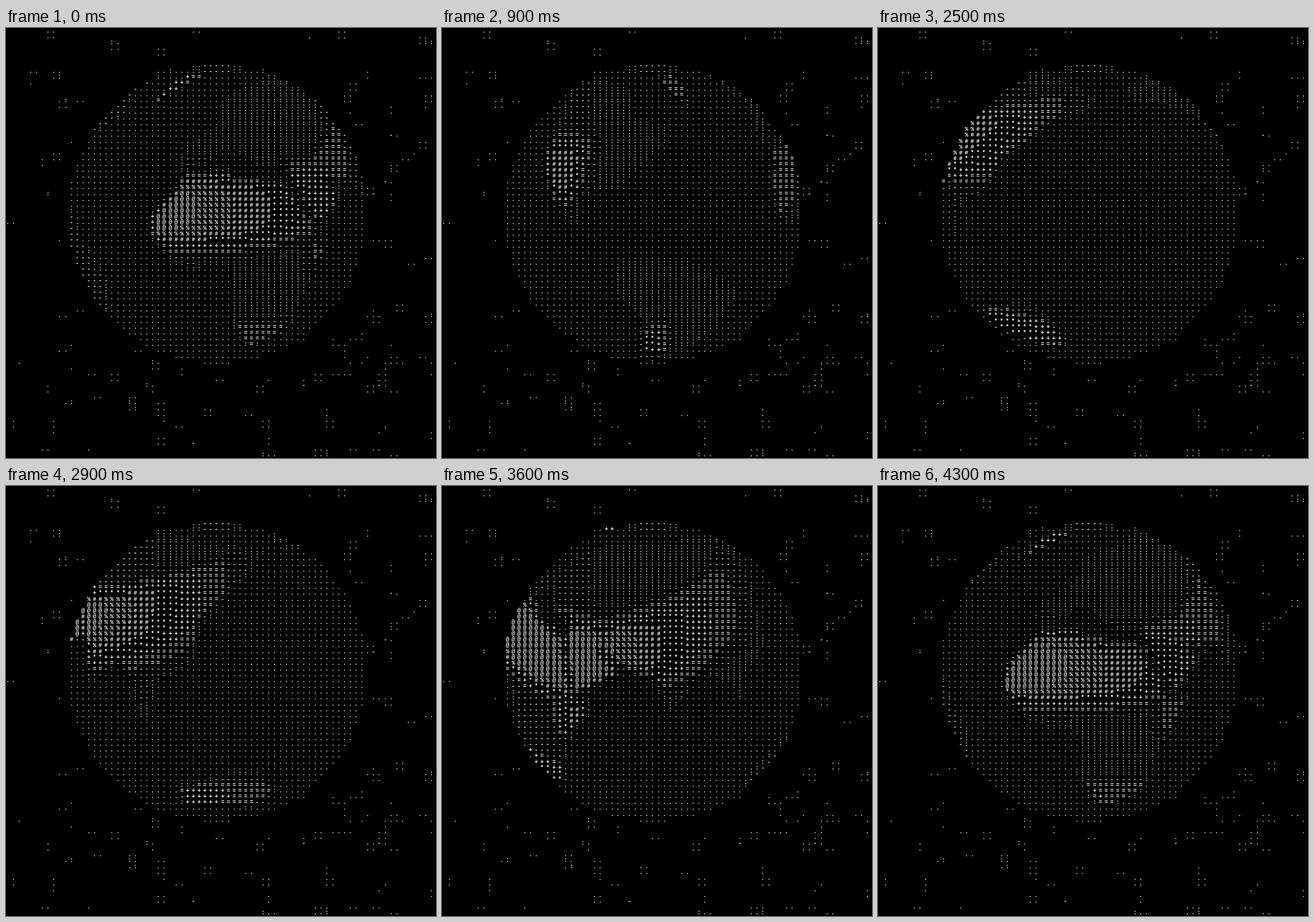
Write an HTML page with a canvas that moves like this. It is 748 px wide and 748 px high and loops after 4.4 s.

```html
<!DOCTYPE html>
<html lang="en">
<head>
<meta charset="utf-8">
<title>Text globe</title>
<style>
html, body { margin: 0; width: 100%; height: 100%; overflow: hidden; background: #000; }
canvas { display: block; width: 748px; height: 748px; }
</style>
</head>
<body>
<canvas id="stage" width="748" height="748"></canvas>
<script>
const ctx = document.getElementById('stage').getContext('2d');
const SIZE = 748, GRID = 74, CELL = SIZE / GRID;
const LOOP = 4400, STEP = 100;
const RAMP = ' .:-=+*#%@';
const RAD = Math.PI / 180;

// Globe placement, in cells; the camera sits DIST radii away, looking from TILT north.
const CX = 36.1, CY = 31.4, R = 25.75, DIST = 6, TILT = 23 * RAD, LON0 = 6;

// Rough coastlines: longitude, latitude.
const africa = [[-17, 15], [-16, 23], [-6, 35], [10, 37], [12, 33], [32, 31], [43, 12],
  [51, 11], [40, -5], [34, -27], [19, -35], [11, -16], [9, 4], [-8, 5]];
const eurasia = [[-9, 37], [-9, 44], [8, 56], [6, 62], [25, 71], [110, 75], [178, 67],
  [140, 54], [121, 38], [120, 26], [107, 18], [104, 2], [97, 17], [89, 22], [77, 8],
  [71, 21], [57, 26], [49, 30], [59, 22], [44, 13], [36, 29], [36, 36], [22, 38],
  [12, 45], [0, 39]];
const northAmerica = [[-165, 62], [-155, 71], [-85, 69], [-80, 57], [-56, 52], [-81, 31],
  [-97, 27], [-95, 17], [-82, 8], [-106, 22], [-123, 38], [-128, 52]];
const southAmerica = [[-78, 8], [-60, 9], [-35, -7], [-41, -22], [-68, -54], [-75, -42],
  [-70, -18], [-81, -5]];
const australia = [[114, -23], [136, -12], [143, -12], [153, -28], [146, -38], [131, -32],
  [115, -34]];
const greenland = [[-58, 80], [-22, 81], [-43, 60]];
const lands = [africa, eurasia, northAmerica, southAmerica, australia];

const clamp = (v, lo, hi) => Math.min(hi, Math.max(lo, v));
const bell = (v, mid, width) => Math.exp(-(((v - mid) / width) ** 4));

function inside(shape, lon, lat) {
  let hit = false;
  shape.forEach(([x1, y1], i) => {
    const [x2, y2] = shape[(i + 1) % shape.length];
    if ((y1 > lat) !== (y2 > lat) && lon < x1 + (lat - y1) / (y2 - y1) * (x2 - x1)) hit = !hit;
  });
  return hit;
}

// Dry belts near the tropics; the northern one drifts poleward across Asia.
function dryness(lon, lat) {
  const north = lat > 0;
  if (lon < -30) {
    return 4.3 * bell(lon, north ? -109 : -69, north ? 12 : 7) * bell(lat, north ? 34 : -29, 11);
  }
  const horn = 3.8 * bell(lon, 45, 9) * bell(lat, 5, 8);
  if (!north) return Math.max(horn, 3 * bell(lat, -26, 9));
  const east = Math.max(0, lon - 50), mid = 24 + 0.4 * east;
  const width = lat < mid ? 13 + 0.15 * east : 13 - 0.04 * east;
  return Math.max(horn, (6.8 - 0.06 * east) * bell(lat, mid, width));
}

function surface(lon, lat) {
  if (lat > 82) return 2.7;
  lon = ((lon + 180) % 360 + 360) % 360 - 180;
  if (inside(greenland, lon, lat)) return 4;
  return lands.some(s => inside(s, lon, lat)) ? 1.7 + dryness(lon, lat) : 0;
}

// Averages four nearby points so that coasts fade.
function albedo(lon, lat) {
  let sum = 0;
  for (const dx of [-1, 1]) for (const dy of [-1, 1]) sum += surface(lon + dx, lat + dy);
  return sum / 4;
}

// Ray through each cell to the sphere: latitude, relative longitude and light.
function castGlobe() {
  const cells = [], k = 1 / Math.sqrt(DIST * DIST - 1);
  for (let row = 0; row < GRID; row++) {
    for (let col = 0; col < GRID; col++) {
      const sx = (col - CX) / R * k, sy = (CY - row) / R * k;
      const q = 1 + sx * sx + sy * sy;
      const root = DIST * DIST - q * (DIST * DIST - 1);
      if (root < 0) continue;
      const t = (DIST - Math.sqrt(root)) / q;
      const x = sx * t, y = sy * t, z = DIST - t;
      cells.push({
        col, row,
        lat: Math.asin(clamp(y * Math.cos(TILT) + z * Math.sin(TILT), -1, 1)) / RAD,
        lon: Math.atan2(x, z * Math.cos(TILT) - y * Math.sin(TILT)) / RAD,
        light: Math.min(1.1, 0.85 - 0.55 * x)
      });
    }
  }
  return cells;
}

// Small clusters of specks, denser towards the lower right.
function scatterSky() {
  const sky = new Map();
  let seed = 11;
  const rnd = () => (seed = seed * 16807 % 2147483647) / 2147483647;
  while (sky.size < 270) {
    const col = Math.floor(rnd() * GRID), row = Math.floor(rnd() * GRID);
    if (rnd() > 0.3 + 0.7 * ((col + row) / 2 / GRID) ** 2) continue;
    const w = rnd() < 0.55 ? 2 : 1, h = rnd() < 0.35 ? 2 : 1;
    for (let i = 0; i < w * h; i++) {
      const c = col + i % w, r = row + Math.floor(i / w), mark = rnd();
      if (c >= GRID || r >= GRID || Math.hypot(c - CX, r - CY) <= R) continue;
      sky.set(r * GRID + c, { col: c, row: r, glyph: mark < 0.92 ? '.' : mark < 0.98 ? ':' : '-' });
    }
  }
  return [...sky.values()];
}

const globe = castGlobe(), sky = scatterSky();

function put(glyph, col, row) {
  ctx.fillText(glyph, Math.floor(col * CELL), Math.floor(row * CELL) + 8);
}

function draw(ms) {
  const lon0 = LON0 - 360 * ms / LOOP;
  ctx.fillStyle = '#000';
  ctx.fillRect(0, 0, SIZE, SIZE);
  ctx.fillStyle = '#fff';
  ctx.font = 'bold 10px "Liberation Mono", monospace';
  for (const s of sky) put(s.glyph, s.col, s.row);
  for (const c of globe) {
    const level = 1.2 + albedo(lon0 + c.lon, c.lat) * c.light;
    put(RAMP[clamp(Math.floor(level), 1, 9)], c.col, c.row);
  }
}

let shown = -1;
function tick() {
  const ms = Math.floor(performance.now() % LOOP / STEP) * STEP;
  if (ms !== shown) draw(shown = ms);
  requestAnimationFrame(tick);
}
tick();
</script>
</body>
</html>
```
